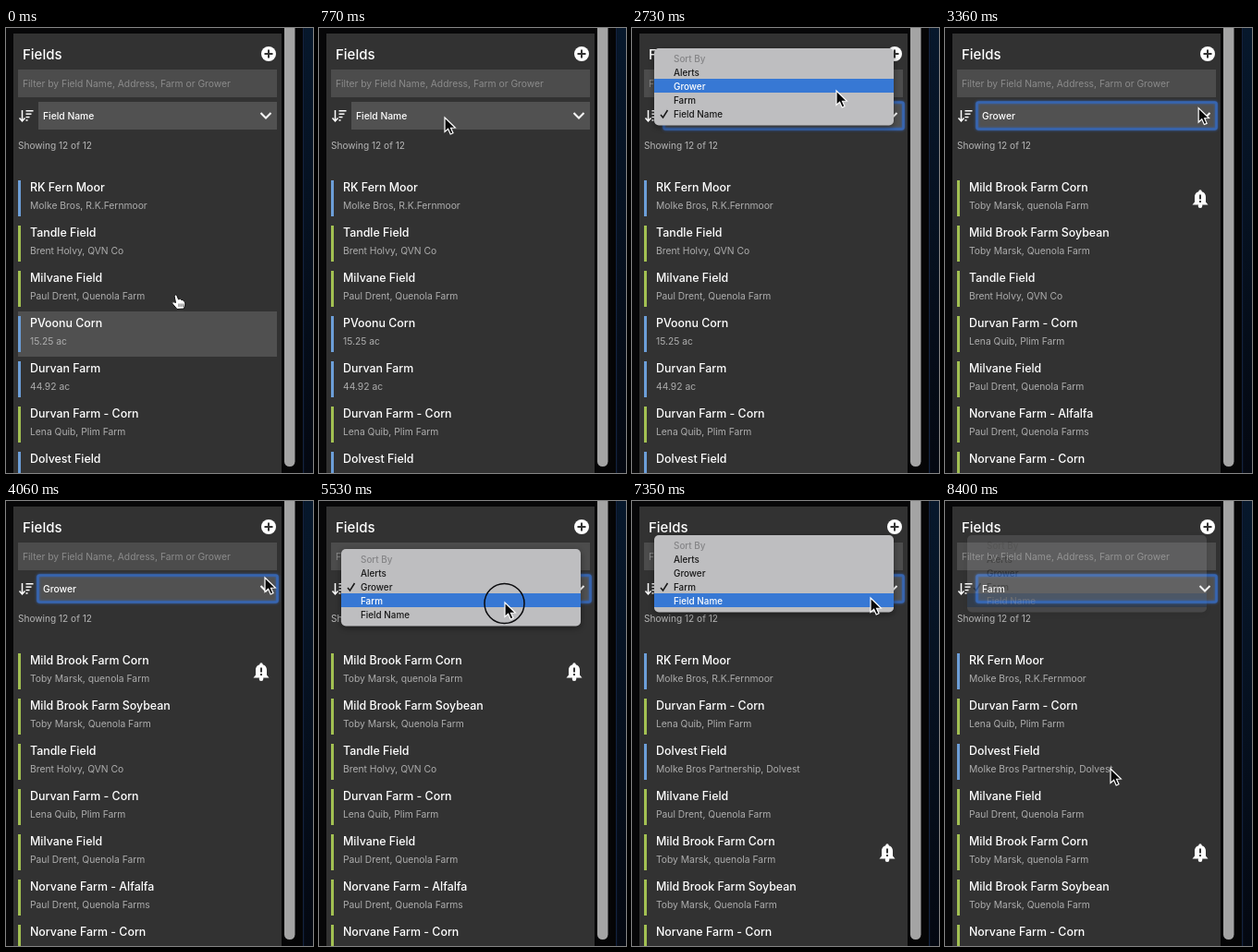
These frames come from a looping animation (332x482 px, 8.47 s). An HTML page with a canvas:

```html
<!DOCTYPE html>
<html lang="en">
<head>
<meta charset="utf-8">
<title>Field list sorting</title>
<style>
html, body { margin: 0; width: 100%; height: 100%; overflow: hidden; background: #060607; }
canvas { display: block; width: 332px; height: 482px; }
</style>
</head>
<body>
<canvas id="stage" width="332" height="482"></canvas>
<script>
const stage = document.getElementById('stage').getContext('2d');
const layer = new OffscreenCanvas(332, 482).getContext('2d');
let ctx = stage;
const LOOP = 8470, STEP = 70;
const BLUE = '#6c9ed8', GREEN = '#a2c052';

const fields = {
  lake: ['RK Fern Moor', 'Molke Bros, R.K.Fernmoor', BLUE],
  tandle: ['Tandle Field', 'Brent Holvy, QVN Co', GREEN],
  milvane: ['Milvane Field', 'Paul Drent, Quenola Farm', GREEN],
  voonu: ['PVoonu Corn', '15.25 ac', BLUE],
  durvan: ['Durvan Farm', '44.92 ac', BLUE],
  durvanCorn: ['Durvan Farm - Corn', 'Lena Quib, Plim Farm', GREEN],
  dolvest: ['Dolvest Field', 'Molke Bros Partnership, Dolvest', BLUE],
  brookCorn: ['Mild Brook Farm Corn', 'Toby Marsk, quenola Farm', GREEN, true],
  brookSoy: ['Mild Brook Farm Soybean', 'Toby Marsk, Quenola Farm', GREEN],
  alfalfa: ['Norvane Farm - Alfalfa', 'Paul Drent, Quenola Farms', GREEN],
  norvaneCorn: ['Norvane Farm - Corn', 'Paul Drent, Quenola Farms', GREEN]
};
const orders = {
  'Field Name': ['lake', 'tandle', 'milvane', 'voonu', 'durvan', 'durvanCorn', 'dolvest'],
  'Grower': ['brookCorn', 'brookSoy', 'tandle', 'durvanCorn', 'milvane', 'alfalfa', 'norvaneCorn'],
  'Farm': ['lake', 'durvanCorn', 'dolvest', 'milvane', 'brookCorn', 'brookSoy', 'norvaneCorn']
};
const options = ['Sort By', 'Alerts', 'Grower', 'Farm', 'Field Name'];

// Pointer stops: time, x, y
const stops = [
  [0, 184, 289], [630, 136, 97], [1470, 136, 97], [2520, 221, 68],
  [2940, 221, 68], [3500, 284, 90], [3710, 284, 90], [4060, 280, 83],
  [4620, 280, 83], [5390, 201, 110], [6230, 201, 110], [6370, 281, 87],
  [6720, 281, 87], [7280, 258, 105], [8120, 258, 105], [8400, 179, 290], [LOOP, 179, 290]
];
// Menu open, fade start, fade end
const menus = [[1120, 3010, 3150], [4340, 5670, 5810], [6720, 8190, 8440]];
const clicks = [840, 2800, 4130, 5460, 6510, 7980];

const clamp = v => Math.max(0, Math.min(1, v));
const ease = p => p * p * (3 - 2 * p);

function pointerAt(t) {
  const i = Math.max(1, stops.findIndex(s => s[0] > t));
  const [t0, x0, y0] = stops[i - 1], [t1, x1, y1] = stops[i];
  const p = ease(clamp((t - t0) / (t1 - t0)));
  return { x: x0 + (x1 - x0) * p, y: y0 + (y1 - y0) * p };
}

function rect(x, y, w, h, color, r = 0) {
  ctx.fillStyle = color;
  ctx.beginPath();
  ctx.roundRect(x, y, w, h, r);
  ctx.fill();
}

function text(str, x, y, size, color, weight = 400) {
  ctx.font = `${weight} ${size}px Inter, "Open Sans", sans-serif`;
  ctx.fillStyle = color;
  ctx.fillText(str, x, y);
}

function line(points, color, width) {
  ctx.strokeStyle = color;
  ctx.lineWidth = width;
  ctx.beginPath();
  points.forEach(([x, y]) => ctx.lineTo(x, y));
  ctx.stroke();
}

function drawFrame() {
  rect(0, 0, 332, 482, '#070708');
  rect(8, 6, 290, 476, '#323232');
  rect(298, 0, 24, 482, '#050506');
  rect(301, -10, 11.5, 485, '#a4a4a4', 5.5);
  rect(321, 0, 1.5, 482, '#13233f');
  const night = ctx.createLinearGradient(0, 0, 0, 482);
  night.addColorStop(0, '#07182c');
  night.addColorStop(1, '#040811');
  rect(322.5, 0, 10, 482, night);
}

function drawFocusRing() {
  ctx.save();
  ctx.shadowColor = '#3565b5';
  ctx.shadowBlur = 3;
  ctx.strokeStyle = '#3765b0';
  ctx.lineWidth = 2.6;
  ctx.beginPath();
  ctx.roundRect(34.5, 80.5, 259, 29, 2);
  ctx.stroke();
  ctx.restore();
}

function drawHeader(sort, focused) {
  text('Fields', 18, 34, 15, '#fff', 500);
  ctx.fillStyle = '#fff';
  ctx.beginPath();
  ctx.arc(284, 28, 8, 0, 7);
  ctx.fill();
  line([[279.5, 28], [288.5, 28]], '#323232', 2);
  line([[284, 23.5], [284, 32.5]], '#323232', 2);

  rect(13, 45, 280, 30, '#4c4c4c');
  text('Filter by Field Name, Address, Farm or Grower', 18, 64, 10.3, '#8b8b8b');

  line([[17.5, 89], [17.5, 100]], '#fff', 1.5);
  line([[14.5, 97.5], [17.5, 100.8], [20.5, 97.5]], '#fff', 1.5);
  [8, 6, 4, 2].forEach((w, i) => rect(21.5, 89 + i * 3.4, w, 1.5, '#fff'));

  rect(35, 80, 258, 30, '#515151');
  if (focused) drawFocusRing();
  text(sort, 40, 99, 10.3, '#fff', 500);
  line([[275.5, 92], [281, 97.5], [286.5, 92]], '#fff', 2);
  text('Showing 12 of 12', 13, 131, 10.1, '#b6b6b6');
}

function drawBell(x, y) {
  ctx.fillStyle = '#fff';
  ctx.beginPath();
  ctx.moveTo(x - 8.5, y + 6.5);
  ctx.lineTo(x - 6, y + 3.5);
  ctx.lineTo(x - 6, y - 2);
  ctx.bezierCurveTo(x - 6, y - 10, x + 6, y - 10, x + 6, y - 2);
  ctx.lineTo(x + 6, y + 3.5);
  ctx.lineTo(x + 8.5, y + 6.5);
  ctx.fill();
  ctx.beginPath();
  ctx.arc(x, y - 8, 1.7, 0, 7);
  ctx.arc(x, y + 7.8, 2.3, 0, Math.PI);
  ctx.fill();
  rect(x - 1, y - 4.5, 2, 5, '#323232');
  rect(x - 1, y + 2, 2, 2, '#323232');
}

function drawList(sort, hovered) {
  orders[sort].forEach((key, i) => {
    const [name, detail, color, alert] = fields[key];
    const y = 160 + i * 49;
    if (i === hovered) rect(13, y, 280, 49, '#505050');
    rect(13, y + 5, 3, 39, color);
    text(name, 26, y + 16.8, 12.4, '#fff', 500);
    text(detail, 26, y + 36, 10.3, '#adadad');
    if (alert) drawBell(276, y + 25);
  });
}

function drawMenu(sort, pointer) {
  const checked = options.indexOf(sort);
  const top = 82 - checked * 15;
  const inside = pointer.x > 24 && pointer.x < 283;
  const active = inside ? Math.floor((pointer.y - top - 3) / 15) : -1;
  ctx.save();
  ctx.shadowColor = 'rgba(0,0,0,.45)';
  ctx.shadowBlur = 6;
  ctx.shadowOffsetY = 2;
  rect(24, top, 259, 83.5, '#bebec0', 5);
  ctx.restore();
  options.forEach((label, i) => {
    const y = top + 11 + i * 15;
    const lit = i > 0 && i === active;
    if (lit) rect(24, y - 8, 259, 15, '#3778d4');
    const ink = lit ? '#fff' : '#171717';
    text(label, 45, y + 3.6, 9.9, i ? ink : '#858587', 500);
    if (i === checked) line([[31, y + 1], [33.5, y + 4], [38.5, y - 4]], ink, 1.5);
  });
}

// Runs a drawing on its own layer so that it fades as one piece
function faded(alpha, draw) {
  ctx = layer;
  ctx.clearRect(0, 0, 332, 482);
  draw();
  ctx = stage;
  ctx.globalAlpha = alpha;
  ctx.drawImage(layer.canvas, 0, 0);
  ctx.globalAlpha = 1;
}

function drawArrow({ x, y }) {
  ctx.save();
  ctx.translate(x, y);
  ctx.beginPath();
  [[0, 0], [0, 15.5], [3.6, 12.2], [6.2, 18], [9, 16.8], [6.5, 11.2], [11.3, 11]]
    .forEach(p => ctx.lineTo(...p));
  ctx.closePath();
  ctx.fillStyle = '#080808';
  ctx.fill();
  ctx.strokeStyle = '#fff';
  ctx.lineWidth = 1.2;
  ctx.stroke();
  ctx.restore();
}

function drawHand({ x, y }) {
  ctx.save();
  ctx.translate(x, y);
  ctx.beginPath();
  ctx.moveTo(-2, 1);
  ctx.quadraticCurveTo(-.5, -1, 1, 1);
  ctx.lineTo(2.5, 5);
  ctx.quadraticCurveTo(5, 3.5, 5.5, 5.5);
  ctx.quadraticCurveTo(8, 4.5, 8.3, 7);
  ctx.quadraticCurveTo(10, 7, 9.8, 10);
  ctx.lineTo(8.5, 15);
  ctx.lineTo(1, 15.5);
  ctx.lineTo(-4.5, 9);
  ctx.quadraticCurveTo(-3.5, 6.5, -.5, 8.5);
  ctx.closePath();
  ctx.fillStyle = '#fff';
  ctx.fill();
  ctx.strokeStyle = '#111';
  ctx.lineWidth = 1;
  ctx.stroke();
  [3, 5.2, 7.4].forEach(fx => line([[fx, 9.5], [fx, 13]], '#333', .8));
  ctx.restore();
}

function render(t) {
  const pointer = pointerAt(t);
  const sort = t < menus[0][2] ? 'Field Name' : t < menus[1][2] ? 'Grower' : 'Farm';
  const overList = t < 700 && pointer.y > 160;
  drawFrame();
  drawHeader(sort, t >= 980);
  drawList(sort, overList ? Math.floor((pointer.y - 140) / 49) : -1);

  const menu = menus.find(([open, , end]) => t >= open && t < end);
  if (menu) {
    const [, fade, end] = menu;
    // The chosen row stays lit while the menu fades
    const picker = pointerAt(Math.min(t, fade - STEP * 2));
    faded(clamp((end - t) / (end - fade)), () => drawMenu(sort, picker));
  }

  if (clicks.some(c => t >= c && t < c + 210)) {
    ctx.strokeStyle = '#0b0b0d';
    ctx.lineWidth = 1.5;
    ctx.beginPath();
    ctx.arc(pointer.x - .5, pointer.y + 1, 21.5, 0, 7);
    ctx.stroke();
  }
  (overList ? drawHand : drawArrow)(pointer);
}

const start = performance.now();
function tick() {
  const t = (performance.now() - start) % LOOP;
  render(Math.floor(t / STEP) * STEP);
  requestAnimationFrame(tick);
}
tick();
</script>
</body>
</html>
```
